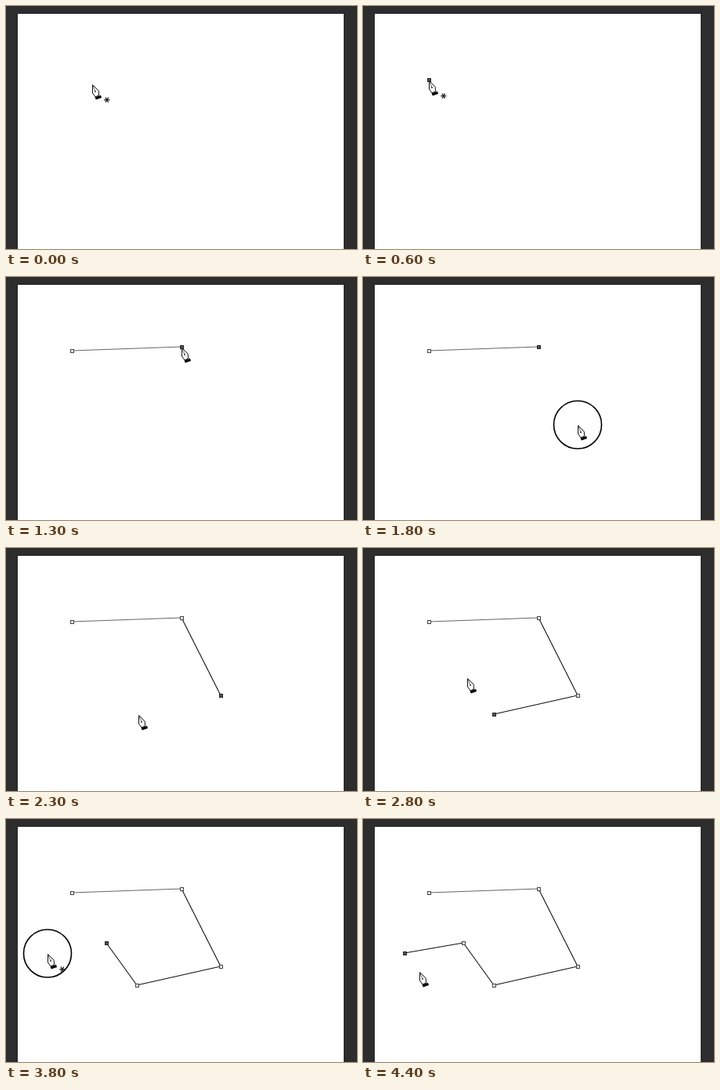
An HTML page with a canvas that plays this animation: 448x310 px, repeating every 4.5 s.

```html
<!DOCTYPE html>
<html lang="en">
<head>
<meta charset="utf-8">
<title>Pen tool</title>
<style>
html, body { margin: 0; width: 100%; height: 100%; overflow: hidden; background: #2d2d2d; }
canvas { display: block; }
</style>
</head>
<body>
<canvas id="stage" width="448" height="310"></canvas>
<script>
const ctx = document.getElementById('stage').getContext('2d');
const LOOP = 4500, STEP = 100, TRAVEL = 400, PRESS = 200;

const point = (x, y) => ({ x, y });
const anchors = [
  point(84, 94), point(224, 89), point(274, 188),
  point(167, 212), point(128, 158), point(53, 171)
];
const last = anchors.length - 1;

// A click every 650 ms, on the step grid; the last points appear late
anchors.forEach((a, i) => {
  a.time = Math.ceil((400 + 650 * i) / STEP) * STEP;
  a.placed = a.time + (i > 3 ? i * 100 : PRESS);
});
const stops = [
  { x: 110, y: 99, time: 0 },
  ...anchors,
  { x: 72, y: 194, time: LOOP }
];

const easeOut = u => 1 - (1 - u) ** 3;
const pressed = (a, t) => t >= a.time && t < a.time + PRESS;

// The pen rests on a stop, then glides to arrive at the next one on time
function tipAt(t) {
  const i = stops.findIndex(s => s.time > t);
  const from = stops[i - 1], to = stops[i];
  const u = Math.max(0, (t - to.time + TRAVEL) / TRAVEL);
  const k = easeOut(u);
  const dip = i === 1 ? 14 * Math.sin(Math.PI * u) : 0;
  return point(
    Math.round(from.x + (to.x - from.x) * k),
    Math.round(from.y + (to.y - from.y) * k + dip) + 1
  );
}

function line(x0, y0, x1, y1, color, width) {
  ctx.strokeStyle = color;
  ctx.lineWidth = width;
  ctx.beginPath();
  ctx.moveTo(x0, y0);
  ctx.lineTo(x1, y1);
  ctx.stroke();
}

function polygon(points, fill) {
  ctx.beginPath();
  points.forEach(([x, y]) => ctx.lineTo(x, y));
  ctx.closePath();
  ctx.fillStyle = fill;
  ctx.fill();
}

function drawPage() {
  ctx.fillStyle = '#2d2d2d';
  ctx.fillRect(0, 0, 448, 310);
  ctx.fillStyle = '#262626';
  ctx.fillRect(14, 9, 418, 301);
  ctx.fillStyle = '#fff';
  ctx.fillRect(15, 10, 416, 300);
}

function drawAnchor({ x, y }, active) {
  ctx.fillStyle = active ? '#555' : '#eee';
  ctx.fillRect(x - 2, y - 2, 5, 5);
  ctx.strokeStyle = active ? '#222' : '#444';
  ctx.lineWidth = 1;
  ctx.strokeRect(x - 1.5, y - 1.5, 4, 4);
}

function drawRing({ x, y }) {
  ctx.strokeStyle = '#000';
  ctx.lineWidth = 1.6;
  ctx.beginPath();
  ctx.arc(x, y + 0.5, 30.5, 0, Math.PI * 2);
  ctx.stroke();
}

function drawStar(x, y) {
  for (let i = 0; i < 3; i++) {
    const a = i * Math.PI / 3, dx = Math.cos(a) * 3.7, dy = Math.sin(a) * 3.7;
    line(x - dx, y - dy, x + dx, y + dy, '#111', 1.2);
  }
}

function drawPen({ x, y }, star) {
  ctx.save();
  ctx.translate(x, y);
  polygon([[0.5, 0.5], [8.3, 8.3], [8.5, 14], [4, 16], [0.5, 11]], '#fff');
  ctx.strokeStyle = '#111';
  ctx.lineWidth = 1;
  ctx.stroke();
  line(0.5, 0.5, 4, 9, '#444', 0.8);
  ctx.fillStyle = '#222';
  ctx.fillRect(3.2, 8.3, 1.6, 1.6);
  polygon([[3.5, 16.5], [11, 13.7], [12, 17], [4.8, 19.5]], '#000');
  if (star) drawStar(18.8, 19.8);
  ctx.restore();
}

function draw(t) {
  drawPage();
  const shown = anchors.filter(a => t >= a.placed);
  shown.slice(1).forEach((b, i) => {
    const a = shown[i];
    line(a.x, a.y, b.x, b.y, i ? '#111' : '#666', 1.1);
  });
  shown.forEach((a, i) => drawAnchor(a, i === shown.length - 1));
  anchors.filter(a => pressed(a, t)).forEach(drawRing);
  drawPen(tipAt(t), t < 800 || pressed(anchors[last], t));
}

const start = performance.now();
function tick() {
  const t = (performance.now() - start) % LOOP;
  draw(Math.floor(t / STEP) * STEP);
  requestAnimationFrame(tick);
}
tick();
</script>
</body>
</html>
```
